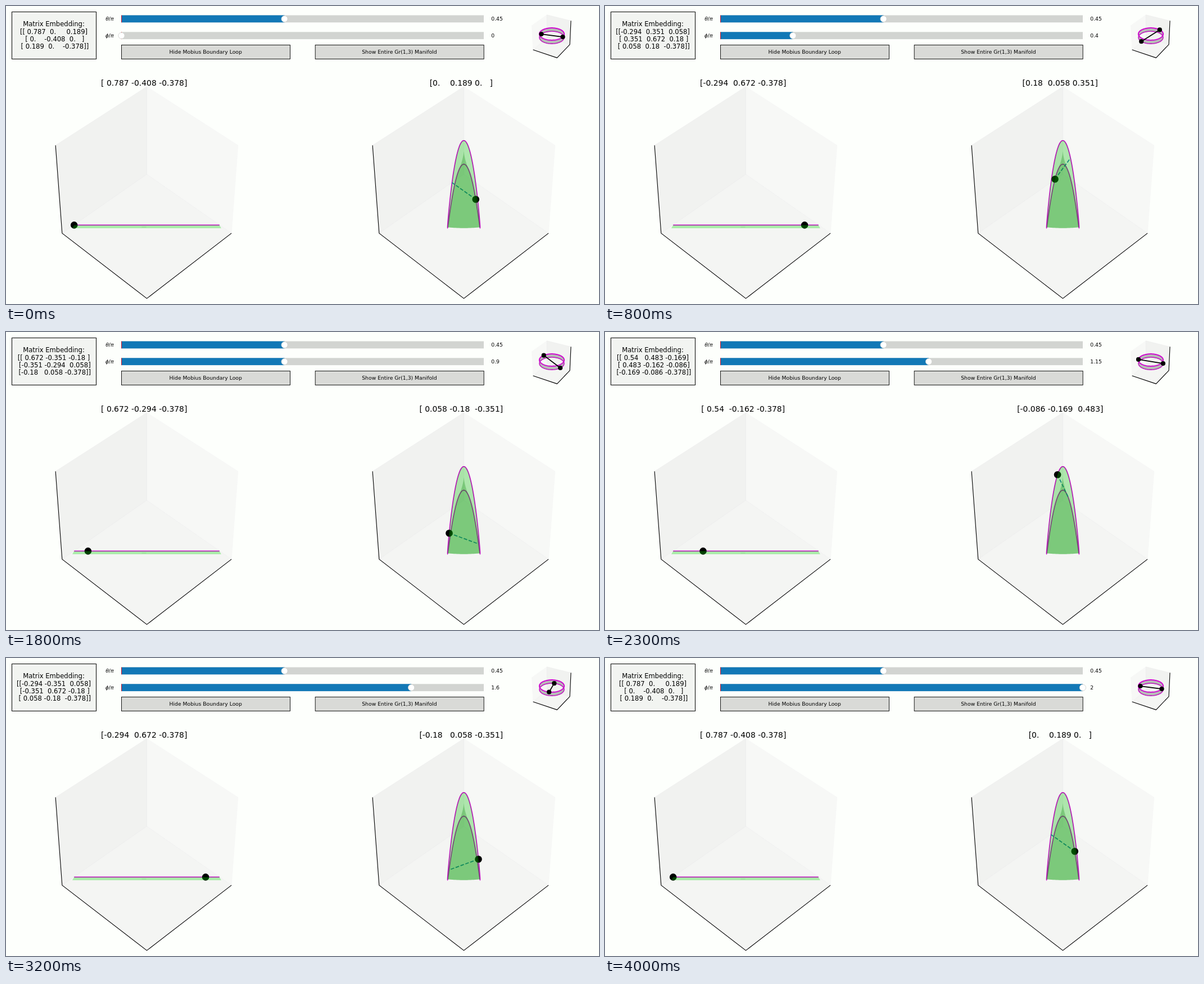
Animation, 1055 px wide and 531 px high, one loop 4100 ms. Source, as an HTML page:

```html
<!DOCTYPE html>
<html lang="en">
<head>
<meta charset="utf-8">
<title>Matrix embedding</title>
<style>
  html, body { margin: 0; width: 100%; height: 100%; overflow: hidden; background: #fdfffc; }
  svg { display: block; width: 1055px; height: 531px; }
  text { font-family: "DejaVu Sans", sans-serif; font-size: 9.26px; white-space: pre; }
  .mid { text-anchor: middle; }
  .title { font-size: 13.89px; text-anchor: middle; }
  .matrix { font-size: 11.57px; text-anchor: middle; }
</style>
</head>
<body>
<svg id="stage" viewBox="0 0 1055 531"></svg>
<script>
const RAD = Math.PI / 180;
const THETA = 0.45, STEP_MS = 100, STEPS = 41;
const SCALE = Math.sqrt(1.5);
const COS = Math.cos(THETA * Math.PI);
const MAGENTA = "#cf0acf", BLUE = "#1278b6";
const TRACK_X = 205.5, TRACK_W = 644.5;
const stage = document.getElementById("stage");

function add(tag, attrs, text) {
  const el = document.createElementNS("http://www.w3.org/2000/svg", tag);
  set(el, attrs);
  if (text !== undefined) el.textContent = text;
  stage.appendChild(el);
  return el;
}
function set(el, attrs) {
  for (const key in attrs) el.setAttribute(key, attrs[key]);
}
const rect = (x, y, width, height, fill, more) => add("rect", { x, y, width, height, fill, ...more });
const label = (x, y, cls, text) => add("text", { x, y, class: cls }, text);
const dot = r => add("circle", { r, fill: "#000" });
const moveDot = (el, [cx, cy]) => set(el, { cx, cy });
const moveLine = (el, [x1, y1], [x2, y2]) => set(el, { x1, y1, x2, y2 });
const path = (points, attrs, close) =>
  add("path", { d: "M" + points.map(p => p.map(v => v.toFixed(2)).join()).join("L") + (close ? "Z" : ""), fill: "none", ...attrs });
const range = (a, b, n, fn) => Array.from({ length: n + 1 }, (_, i) => fn(a + (b - a) * i / n));

// Perspective camera looking at the centre of a box with the given half size.
function camera(cx, cy, focal, dist, azim, elev, half, mid) {
  const ca = Math.cos(azim * RAD), sa = Math.sin(azim * RAD);
  const ce = Math.cos(elev * RAD), se = Math.sin(elev * RAD);
  return point => {
    const [x, y, z] = point.map(v => (v - mid) / half);
    const near = x * ca + y * sa;
    const k = focal / (dist - near * ce - z * se);
    return [cx + k * (y * ca - x * sa), cy - k * (z * ce - near * se)];
  };
}

function drawBox(cam, half, mid, backY, axes) {
  const at = p => cam(p.map(v => mid + v * half));
  const pane = (corners, fill) =>
    path(corners.map(at), { fill, "fill-opacity": 0.5, stroke: fill, "stroke-opacity": 0.5, "stroke-width": 0.83 }, true);
  pane([[-1, -1, -1], [-1, 1, -1], [-1, 1, 1], [-1, -1, 1]], "#f2f2f2");
  pane([[-1, backY, -1], [1, backY, -1], [1, backY, 1], [-1, backY, 1]], "#e6e6e6");
  pane([[-1, -1, -1], [1, -1, -1], [1, 1, -1], [-1, 1, -1]], "#ececec");
  path(axes.map(at), { stroke: "#000", "stroke-width": 1.1, "stroke-linejoin": "round" });
}

// Unit vector at angle phi (degrees); t scales the height from the equator (0) to the loop (1).
function unit(phi, t = 1) {
  const c = COS * t, s = Math.sqrt(1 - c * c);
  return [s * Math.cos(phi * RAD), s * Math.sin(phi * RAD), c];
}
const embed = v => v.map((a, i) => v.map((b, j) => SCALE * (a * b - (i === j ? 1 / 3 : 0))));
const diagonal = m => [m[0][0], m[1][1], m[2][2]];
const offDiagonal = m => [m[1][2], m[0][2], m[0][1]];

// Array printing with aligned decimal points.
function formatter(values) {
  const split = v => (Math.round(v * 1000) / 1000 + 0).toFixed(3).replace(/0+$/, "").replace(/^-0\.$/, "0.").split(".");
  const parts = values.map(split);
  const left = Math.max(...parts.map(p => p[0].length));
  const right = Math.max(...parts.map(p => p[1].length));
  return row => "[" + row.map(split).map(([a, b]) => a.padStart(left) + "." + b.padEnd(right)).join(" ") + "]";
}
const printRow = row => formatter(row)(row);

const leftCam = camera(250.5, 329.5, 2089, 18.9, 45, 45, 0.7, 0.2);
const rightCam = camera(814.5, 329.5, 2089, 18.9, 45, 45, 0.7, 0);
const ballCam = camera(971, 52.5, 400, 18, -60, 30, 1, 0);
const leftAt = (phi, t) => leftCam(diagonal(embed(unit(phi, t))));
const rightAt = (phi, t) => rightCam(offDiagonal(embed(unit(phi, t))));

// Controls
rect(10.5, 10.5, 150, 84, "#f2f4f1", { stroke: "#000", "stroke-width": 1 });
label(85, 36.3, "matrix", "Matrix Embedding:");
const rows = [0, 1, 2].map(i => label(85, 49.5 + i * 13.3, "matrix", ""));

function slider(y, symbol) {
  const name = label(191.5, y + 3.4, "", "");
  name.setAttribute("text-anchor", "end");
  name.innerHTML = `<tspan font-style="italic">${symbol}</tspan>/<tspan font-style="italic">π</tspan>`;
  rect(TRACK_X, y - 6.5, TRACK_W, 12.8, "#d2d4d1");
  const bar = rect(TRACK_X, y - 6.5, 0, 12.8, BLUE);
  rect(TRACK_X - 0.4, y - 6.5, 0.9, 12.8, "#e00010");
  const knob = add("circle", { cy: y, r: 5.6, fill: "#fff", stroke: "#d0d2cf", "stroke-width": 0.9 });
  const value = label(863.3, y + 3.4, "", "");
  return (v, max) => {
    const w = TRACK_W * v / max;
    bar.setAttribute("width", w);
    knob.setAttribute("cx", TRACK_X + w);
    value.textContent = String(+v.toFixed(2));
  };
}
slider(23, "θ")(THETA, 1);
const setPhi = slider(52.8, "ϕ");

function button(x, text) {
  rect(x, 69.5, 300, 25, "#d9dad7", { stroke: "#000", "stroke-width": 0.9 });
  label(x + 149.7, 85.2, "mid", text);
}
button(205.5, "Hide Mobius Boundary Loop");
button(550.2, "Show Entire Gr(1,3) Manifold");

const leftTitle = label(245.7, 142, "title", "");
const rightTitle = label(809.8, 142, "title", "");
const bigAxes = [[1, -1, 1], [1, -1, -1], [1, 1, -1], [-1, 1, -1]];
const loopStroke = { stroke: MAGENTA, "stroke-width": 1.75 };

// Diagonal entries
drawBox(leftCam, 0.7, 0.2, -1, bigAxes);
path([leftAt(0), leftAt(90)], loopStroke);
const leftDot = dot(6.3);
path([leftAt(0), leftAt(90), leftAt(90, 0), leftAt(0, 0)], { fill: "rgba(0,215,0,.3)" }, true);
rect(241.5, 393.4, 8, 1, "rgba(0,90,0,.12)");

// Off-diagonal entries
drawBox(rightCam, 0.7, 0, -1, bigAxes);
path(range(0, 360, 180, p => rightAt(p)), loopStroke, true);
const chord = add("line", { stroke: "#1f77b4", "stroke-width": 1.75, "stroke-dasharray": "6.4 2.8" });
const rightDot = dot(6.3);
const FRONT = "rgba(0,130,0,.28)";
path([...range(135, 315, 90, p => rightAt(p)), ...range(-1, 1, 20, t => rightAt(135, t))],
  { fill: "rgba(0,190,0,.3)" }, true);
path([...range(-45, 135, 90, p => rightAt(p)), ...range(1, -1, 20, t => rightAt(135, t))],
  { fill: FRONT }, true);

// The sheet folds over itself between the inner arch and the envelope of its rulings.
function envelope(d) {
  const start = Math.asin(Math.abs(d)) / RAD;
  return range(start + 1e-4, 89, 200, psi => {
    const side = d < 0 ? -1 : 1;
    return rightAt(45 + side * psi, Math.abs(d) / Math.sin(psi * RAD));
  }).reduce((a, b) => b[1] < a[1] ? b : a);
}
path([...range(-0.6, 0.6, 80, envelope),
  ...range(0.6, -0.6, 80, d => rightAt(45 + Math.asin(d) / RAD))], { fill: FRONT }, true);

// Sphere band
drawBox(ballCam, 1.11, 0, 1, [[-1, -1, -1], [1, -1, -1], [1, 1, -1], [1, 1, 1]]);
const ring = t => range(0, 360, 90, p => ballCam(unit(p, t)));
path(ring(-1), { stroke: MAGENTA, "stroke-width": 1.75 }, true);
for (const a of [30, 210]) {
  path([...range(a, a + 180, 45, p => ballCam(unit(p, 1))), ...range(a + 180, a, 45, p => ballCam(unit(p, -1)))],
    { fill: "rgba(128,135,128,.5)" }, true);
}
path(ring(1), { stroke: MAGENTA, "stroke-width": 2 }, true);
const axisLine = add("line", { stroke: "#000", "stroke-width": 1.75 });
const poles = [dot(4.1), dot(4.1)];

function draw(ms) {
  const step = Math.floor(ms / STEP_MS) % STEPS;
  const turns = step * 0.05, phi = step * 9;
  const v = unit(phi), m = embed(v);
  const print = formatter(m.flat());
  rows.forEach((row, i) => {
    row.textContent = (i ? " " : "[") + print(m[i]) + (i === 2 ? "]" : "");
  });
  leftTitle.textContent = printRow(diagonal(m));
  rightTitle.textContent = printRow(offDiagonal(m));
  setPhi(turns, 2);

  moveDot(leftDot, leftAt(phi));
  moveDot(rightDot, rightAt(phi));
  moveLine(chord, rightAt(phi), rightAt(phi + 180));

  const ends = [ballCam(v), ballCam(v.map(c => -c))];
  moveLine(axisLine, ...ends);
  poles.forEach((p, i) => moveDot(p, ends[i]));
}

const begin = performance.now();
function tick() {
  draw(performance.now() - begin);
  requestAnimationFrame(tick);
}
tick();
</script>
</body>
</html>
```
